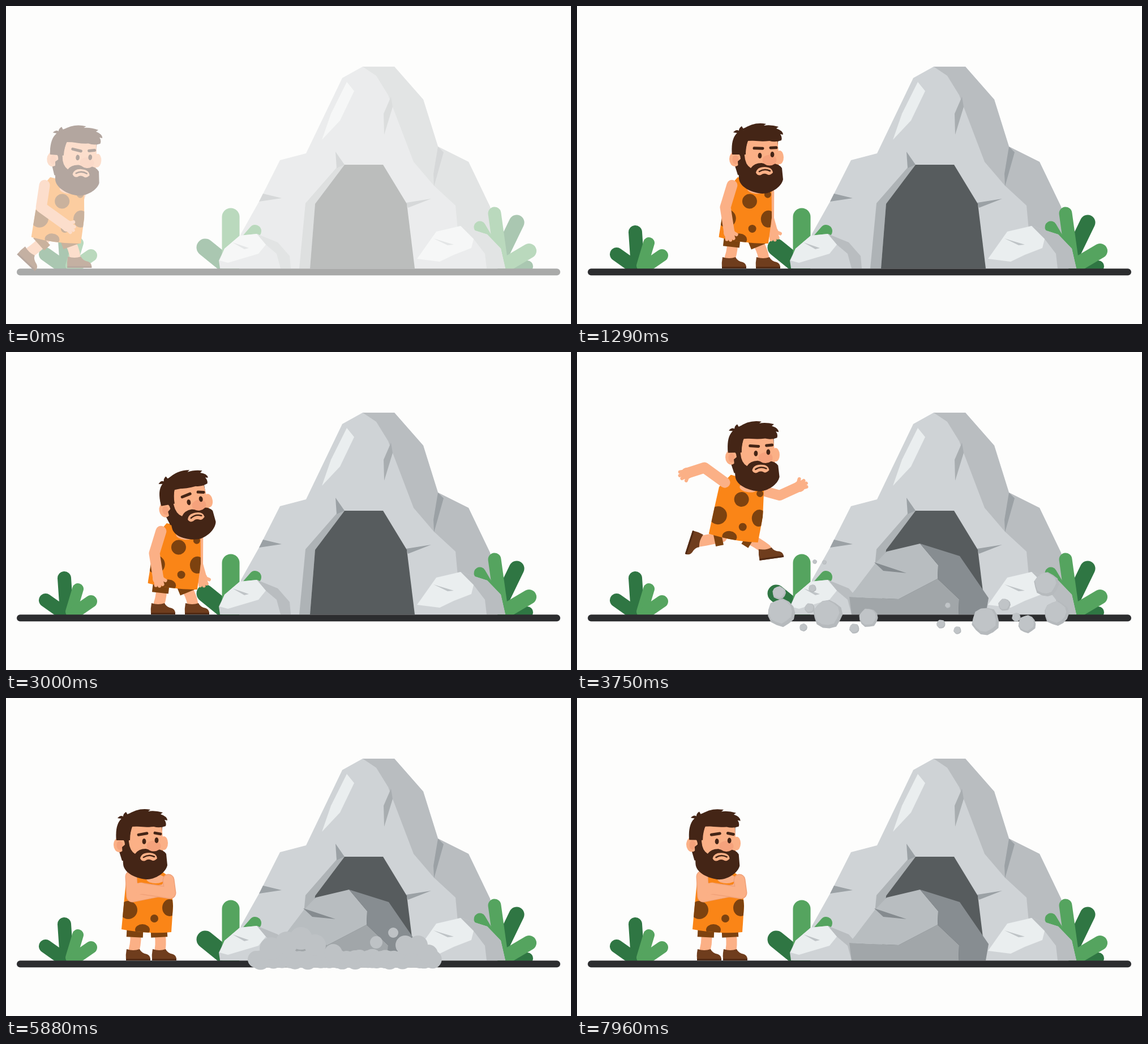
Animation, 998 px wide and 561 px high, one loop 8 s. Source, as an HTML page:

```html
<!DOCTYPE html>
<html lang="en">
<head>
<meta charset="utf-8">
<title>Caveman and boulder</title>
<style>
  html, body { margin: 0; width: 100%; height: 100%; overflow: hidden; background: #fdfdfc; }
  svg { display: block; width: 100%; height: 100%; }
  .leaf path { fill: none; stroke: #55a45f; stroke-linecap: round; }
  .leaf .dk { stroke: #2f7643; }
  .base { fill: #cfd3d6; }
  .shade { fill: #b9bdc0; }
  .lit { fill: #eaeeef; }
  .crack { fill: #9ba1a5; }
  .skin { fill: #fbb086; }
  .hair { fill: #442516; }
  .spot { fill: #7d420f; }
  .limb { fill: none; stroke: #fbb086; stroke-linejoin: round; stroke-linecap: round; }
  .edge { fill: none; stroke: #f0a078; stroke-width: 21; stroke-linejoin: round; stroke-linecap: round; }
  .short { fill: none; stroke: #7d420f; stroke-width: 29; }
  .line { fill: none; stroke: #442516; stroke-linecap: round; }
</style>
</head>
<body>
<svg viewBox="0 0 998 561">
  <defs>
    <clipPath id="above"><path d="M0 0H998V464H0Z"/></clipPath>
    <clipPath id="cloth"><path d="M-20-112L-38-88L-41-58L-46-4Q0 5 42 1L45-45L41-95L28-104Z"/></clipPath>
    <g id="hand">
      <circle class="skin" r="10"/>
      <path class="limb" stroke-width="6" d="M4-5L11-6M5 0L13 0M4 5L11 6M0-6L5-12"/>
    </g>
    <g id="shoe">
      <path fill="#6f3d1d" d="M-13-2Q-1 2 10-2Q13 5 23 7Q30 10 29 18H-14Q-15 8-13-2Z"/>
      <path fill="#512a14" d="M-14 15H29V18H-14Z"/>
    </g>
  </defs>

  <g id="scene">
    <g class="leaf" clip-path="url(#above)">
      <path class="dk" stroke-width="24" d="M103 399L107 458M70 438L104 462"/>
      <path stroke-width="20" d="M127 418L115 458"/>
      <path stroke-width="22" d="M150 440L118 462"/>
    </g>

    <path class="base" d="M400 463L415 402L447 345L484 272L530 260L594 127L630 107H686L737 165L763 248L817 275L855 354L882 463Z"/>
    <path class="shade" d="M630 107H686L737 165L763 248L756 317L720 275L683 178L675 157L654 123Z"/>
    <path class="shade" d="M763 248L817 275L855 354L870 430L798 395L794 352L756 317Z"/>
    <path fill="#a8adb0" d="M680 160L683 178L668 227L667 190Z"/>
    <path class="crack" d="M763 248L773 258L756 318L755 296ZM454 331L487 339L447 345ZM751 340L710 356L707 347Z"/>
    <path class="lit" d="M602 134L615 150L590 202L558 236L574 190Z"/>
    <path fill="#aeb3b6" d="M584 285L598 280L546 349L537 463H518L529 348Z"/>
    <path class="crack" d="M582 257L598 280L584 286Z"/>
    <path fill="#575c5e" d="M598 280H666L708 349L722 463H537L546 349Z"/>

    <g class="leaf" clip-path="url(#above)">
      <path class="dk" stroke-width="31" d="M352 426L394 460"/>
      <path stroke-width="31" d="M397 372V460"/>
      <path stroke-width="22" d="M440 397L420 420"/>
      <path class="dk" stroke-width="27" d="M902 382L870 448"/>
      <path class="dk" stroke-width="20" d="M921 459H880"/>
      <path stroke-width="21" d="M837 390L850 412"/>
      <path stroke-width="23" d="M863 366L874 445"/>
      <path stroke-width="26" d="M924 432L880 458"/>
    </g>

    <path class="base" d="M378 463L376 449L386 428L413 405L443 402L480 417L501 441L503 463Z"/>
    <path class="shade" d="M443 402L480 417L501 441L503 463H485L478 437L459 421Z"/>
    <path class="lit" d="M377 449L386 428L413 405L443 402L459 421L446 437L392 453Z"/>
    <path fill="#bfc4c7" d="M400 417L429 427L421 429Z"/>
    <path class="base" d="M722 463L727 445L760 398L803 388L850 403L874 428L882 463Z"/>
    <path class="shade" d="M803 388L850 403L874 428L882 463H849L846 437L826 411Z"/>
    <path class="lit" d="M726 446L760 398L803 388L826 411L822 427L791 439L766 451Z"/>
    <path fill="#bfc4c7" d="M755 410L791 421L780 422Z"/>

    <g id="boulder">
      <path fill="#a1a6a9" d="M481 432L568 436L637 400L675 436L674 463H485Z"/>
      <path fill="#b8bdc0" d="M481 432L491 420L526 374L547 352L606 338L638 376L637 400L568 436Z"/>
      <path fill="#878d91" d="M606 338L676 360L727 434L722 463H674L675 436L637 400L638 376Z"/>
      <path fill="#858b8f" d="M525 371L582 390L541 386Z"/>
    </g>

    <rect x="19" y="463.3" width="960" height="12" rx="6" fill="#2c2d2f"/>

    <g id="man">
      <g id="rArm"><path class="edge"/><path class="limb" stroke-width="18"/><use href="#hand"/></g>
      <g id="lLeg"><path class="limb" stroke-width="19"/><path class="short"/><use href="#shoe"/></g>
      <g id="rLeg"><path class="limb" stroke-width="19"/><path class="short"/><use href="#shoe"/></g>
      <g id="body">
        <g clip-path="url(#cloth)">
          <path fill="#fa8517" d="M-50-115H50V8H-50Z"/>
          <g class="spot">
            <circle cx="4" cy="-71" r="13"/><circle cx="-34" cy="-38" r="16"/>
            <ellipse cx="39" cy="-42" rx="13" ry="15"/><circle cx="12" cy="-23" r="7"/>
            <ellipse cx="-9" cy="-3" rx="13" ry="10"/><circle cx="35" cy="-85" r="6"/>
          </g>
        </g>
        <ellipse class="skin" cx="14" cy="-93" rx="16" ry="8"/>
      </g>
      <g id="lArm"><path class="edge"/><path class="limb" stroke-width="19"/><use href="#hand"/></g>
      <g id="head">
        <ellipse class="skin" cx="40" cy="-3" rx="7" ry="12"/>
        <path class="hair" d="M-44-4C-46-40-35-60 4-58C30-58 40-45 37-30V28H-34Z"/>
        <path class="skin" d="M-22-8L-17-32L36-34L39-2L38 26L-10 30L-23 12Z"/>
        <ellipse class="skin" cx="-39" cy="0" rx="10" ry="13"/>
        <ellipse cx="-38" cy="1" rx="5.5" ry="8" fill="#f4a27b"/>
        <path class="hair" d="M-34 4L-22-6Q-21 10-11 16Q-5 7 8 7Q17 10 25 8Q38 7 44 16L46 36C43 50 24 61 10 61C-8 60-31 50-32 34Z"/>
        <path class="skin" d="M-2 24Q0 14 13 14Q27 14 28 24Q22 30 18 27Q12 24 7 28Q1 30-2 24Z"/>
        <path class="line" stroke-width="2.6" d="M4 22Q13 16 23 21"/>
        <ellipse cx="22" cy="2" rx="12.5" ry="9.5" fill="#f5a27c"/>
        <g class="hair"><ellipse cx="5" cy="-6" rx="3.4" ry="5"/><ellipse cx="27" cy="-8" rx="3.4" ry="5"/></g>
        <path id="browL" class="line" stroke-width="5" d="M-5-19H10"/>
        <path id="browR" class="line" stroke-width="5" d="M24-20H34"/>
        <path class="hair" d="M-44-8C-46-28-42-40-35-46L-42-47Q-37-53-32-50Q-32-55-27-58L-24-53Q-6-66 16-62L12-59Q24-61 38-57L34-54Q46-50 46-43L41-44Q45-39 43-33Q32-29 22-32Q4-30-15-34Q-20-24-20-8Z"/>
      </g>
    </g>

    <g id="debris"></g>
    <g id="dust" fill="#bec2c5"></g>
  </g>
</svg>
<script>
const LOOP = 8000;
const $ = id => document.getElementById(id);
const clamp = v => Math.max(0, Math.min(1, v));
const span = (t, a, b) => clamp((t - a) / (b - a));
const ease = {
  lin: u => u,
  io: u => u * u * (3 - 2 * u),
  out: u => u * (2 - u),
  in: u => u * u
};

// Joints are relative to the middle of the hem; arms: elbow, hand; feet: ankle, turn.
const walk = { rot: 4, brow: 10, head: [31, -142, 4], la: [-28, -60, 18, -27], ra: [34, -60, 24, -30], lf: [-48, 20, 42], rf: [30, 30, -6] };
const run = { rot: 1, brow: 12, head: [26, -143, 4], la: [-56, -74, -62, -36], ra: [52, -47, 79, -40], lf: [-32, 5, 78], rf: [-1, 26, 0] };
const look = { rot: 4, brow: -12, head: [23, -143, -10], la: [-34, -60, -27, -15], ra: [43, -40, 50, -15], lf: [-26, 30, 0], rf: [34, 30, 0] };
const stand = { ...look, brow: 2, head: [22, -145, 0] };
const leap = { rot: 7, brow: 5, head: [33, -145, -1], la: [-53, -126, -84, -116], ra: [80, -77, 115, -93], lf: [-61, 4, 108], rf: [56, 18, -8] };
const rest = { rot: 0, brow: 4, head: [8, -151, 0], la: [-56, -66, -52, -30], ra: [70, -68, 68, -32], lf: [-25, 32, 0], rf: [22, 32, 0] };
const fold = { rot: 0, brow: -10, head: [-11, -153, 0], la: [-27, -62, 28, -73], ra: [40, -68, -12, -76], lf: [-24, 33, 0], rf: [22, 33, 0] };
const sulk = { ...fold, head: [-8, -153, 1] };

const keys = [
  [0, 90, 415, walk],
  [580, 238, 419, run, 'lin'],
  [860, 296, 415, stand, 'out'],
  [1500, 296, 415, stand],
  [1780, 296, 415, look],
  [3500, 296, 415, look],
  [3750, 278, 330, leap, 'out'],
  [4050, 253, 413, rest, 'in'],
  [4200, 250, 413, rest],
  [4850, 250, 413, rest],
  [5120, 250, 412, fold],
  [6500, 250, 412, fold],
  [7000, 250, 412, sulk],
  [LOOP, 250, 412, sulk]
];

const mix = (a, b, u) => a + (b - a) * u;
const mixPose = (a, b, u) => Object.fromEntries(Object.keys(a).map(k =>
  [k, Array.isArray(a[k]) ? a[k].map((v, i) => mix(v, b[k][i], u)) : mix(a[k], b[k], u)]));

// Two and a half steps bring him from the entry pose to the running pose.
function stride(pose, t) {
  const a = Math.PI * 2.5 * t / 580, c = Math.cos(a), s = Math.sin(a);
  const foot = (c, s, x) => {
    const lift = Math.max(0, s);
    return [x - 39 * c - 17 * lift, 29 - 23 * lift - 9 * Math.max(0, c), 78 * lift + 42 * Math.max(0, c)];
  };
  const swing = (1 - Math.cos(3 * Math.PI * t / 580)) / 2;
  const arms = mixPose(walk, run, swing);
  return { ...pose, la: arms.la, ra: arms.ra, lf: foot(c, s, -9), rf: foot(-c, -s, -7) };
}

function poseAt(t) {
  let i = 1;
  while (keys[i][0] < t) i++;
  const [t0, x0, y0, a] = keys[i - 1], [t1, x1, y1, b, e = 'io'] = keys[i];
  const u = ease[e](span(t, t0, t1));
  const pose = mixPose(a, b, u);
  return { x: mix(x0, x1, u), y: mix(y0, y1, u), pose: t < 580 ? stride(pose, t) : pose };
}

const place = (el, x, y, r = 0) => el.setAttribute('transform', `translate(${x} ${y}) rotate(${r})`);

function drawArm(el, [ex, ey, hx, hy], sx, sy, rot, edge) {
  const r = rot * Math.PI / 180, c = Math.cos(r), s = Math.sin(r);
  const d = `M${sx * c - sy * s} ${sx * s + sy * c}L${ex} ${ey}L${hx} ${hy}`;
  const [rim, limb, hand] = el.children;
  rim.setAttribute('d', d);
  rim.setAttribute('opacity', edge);
  limb.setAttribute('d', d);
  place(hand, hx, hy, Math.atan2(hy - ey, hx - ex) * 180 / Math.PI);
}

function drawLeg(el, [x, y, r], hip) {
  const dx = x - hip, dy = y + 4, len = Math.hypot(dx, dy) || 1;
  const [limb, short, shoe] = el.children;
  limb.setAttribute('d', `M${hip} -4Q${hip + dx / 2 + 4} ${dy / 2 - 4} ${x} ${y}`);
  short.setAttribute('d', `M${hip} -4L${hip + dx / len * 14} ${-4 + dy / len * 14}`);
  place(shoe, x, y, r);
}

const man = $('man'), head = $('head'), rArm = $('rArm');

function drawMan(t) {
  const { x, y, pose } = poseAt(t);
  const crossed = span(t, 4950, 5120);
  place(man, x, y);
  place($('body'), 0, 0, pose.rot);
  place(head, ...pose.head);
  $('browL').setAttribute('transform', `rotate(${pose.brow} 3 -19)`);
  $('browR').setAttribute('transform', `rotate(${-pose.brow} 29 -20)`);
  man.insertBefore(rArm, t > 4880 ? head : $('lLeg'));
  drawArm($('lArm'), pose.la, -29, -97, pose.rot, crossed);
  drawArm(rArm, pose.ra, 37, -91, pose.rot, crossed);
  drawLeg($('lLeg'), pose.lf, -22);
  drawLeg($('rLeg'), pose.rf, 20);
}

function add(parent, tag, attrs) {
  const el = document.createElementNS('http://www.w3.org/2000/svg', tag);
  for (const k in attrs) el.setAttribute(k, attrs[k]);
  return parent.appendChild(el);
}

// Landing places of the flying stones: x, y, radius.
const stones = [
  [361, 460, 25], [357, 425, 12], [443, 463, 26], [515, 469, 17], [490, 488, 9],
  [722, 475, 25], [795, 480, 16], [847, 461, 22], [829, 410, 22], [755, 446, 11],
  [643, 480, 8], [672, 491, 7], [416, 417, 7], [400, 486, 7], [420, 370, 4],
  [437, 371, 4], [411, 452, 9], [655, 447, 5], [776, 468, 8]
].map(([x, y, r], i) => {
  const el = add($('debris'), 'g', {});
  const ring = k => 'M' + Array.from({ length: 13 }, (_, j) => {
    const a = j / 13 * Math.PI * 2, q = r * k * (.97 + .05 * Math.sin(j * 2.6 + i));
    return `${(Math.cos(a) * q).toFixed(1)} ${(Math.sin(a) * q).toFixed(1)}`;
  }).join('L') + 'Z';
  add(el, 'path', { d: ring(1), fill: '#b6babd' });
  add(el, 'path', { d: ring(.86), fill: '#c0c4c7', transform: `translate(${-r * .08} ${-r * .1})` });
  return { el, x, y };
});

const puffs = Array.from({ length: 42 }, (_, i) =>
  [442 + i * 7.6, 461 + 2 * Math.sin(i * 2.3), 15 + 2 * Math.sin(i * 1.7)])
  .concat([[468, 442, 20], [496, 432, 20], [521, 424, 20], [546, 436, 19], [578, 450, 16],
    [654, 431, 11], [684, 414, 9], [705, 436, 17], [728, 436, 17], [746, 452, 17]])
  .map(([x, y, r]) => ({ el: add($('dust'), 'circle', { r }), x, y, r }));

function drawBurst(t) {
  const u = span(t, 3490, 3750), v = Math.pow(u, .7), late = span(t, 3750, 4250);
  $('debris').setAttribute('opacity', t < 3490 ? 0 : 1 - span(t, 3900, 4250));
  stones.forEach(({ el, x, y }, i) => {
    const ox = mix(600, x, .55);
    const px = mix(ox, x, v) + (x - 600) * .08 * late;
    const py = mix(455, y, v) - 150 * u * (1 - u) + (y < 440 ? 45 * ease.in(late) : 0);
    place(el, px, py, (u - 1 + late) * (i % 2 ? 90 : -90));
  });
}

function drawDust(t) {
  const grow = ease.out(span(t, 5350, 5880)), fade = span(t, 5950, 6750);
  $('dust').setAttribute('opacity', span(t, 5350, 5550) * (1 - fade));
  puffs.forEach(({ el, x, y, r }) => {
    el.setAttribute('cx', mix(600, x, .75 + .25 * grow + .06 * fade));
    el.setAttribute('cy', mix(462, y, grow) - 10 * fade);
    el.setAttribute('r', r * (.4 + .6 * grow) * (1 - .5 * fade));
  });
}

function frame() {
  const t = performance.now() % LOOP;
  $('scene').setAttribute('opacity', mix(.4, 1, span(t, 0, 330)));
  place($('boulder'), 0, -480 * (1 - ease.in(span(t, 3240, 3490))));
  drawMan(t);
  drawBurst(t);
  drawDust(t);
  requestAnimationFrame(frame);
}
frame();
</script>
</body>
</html>
```
